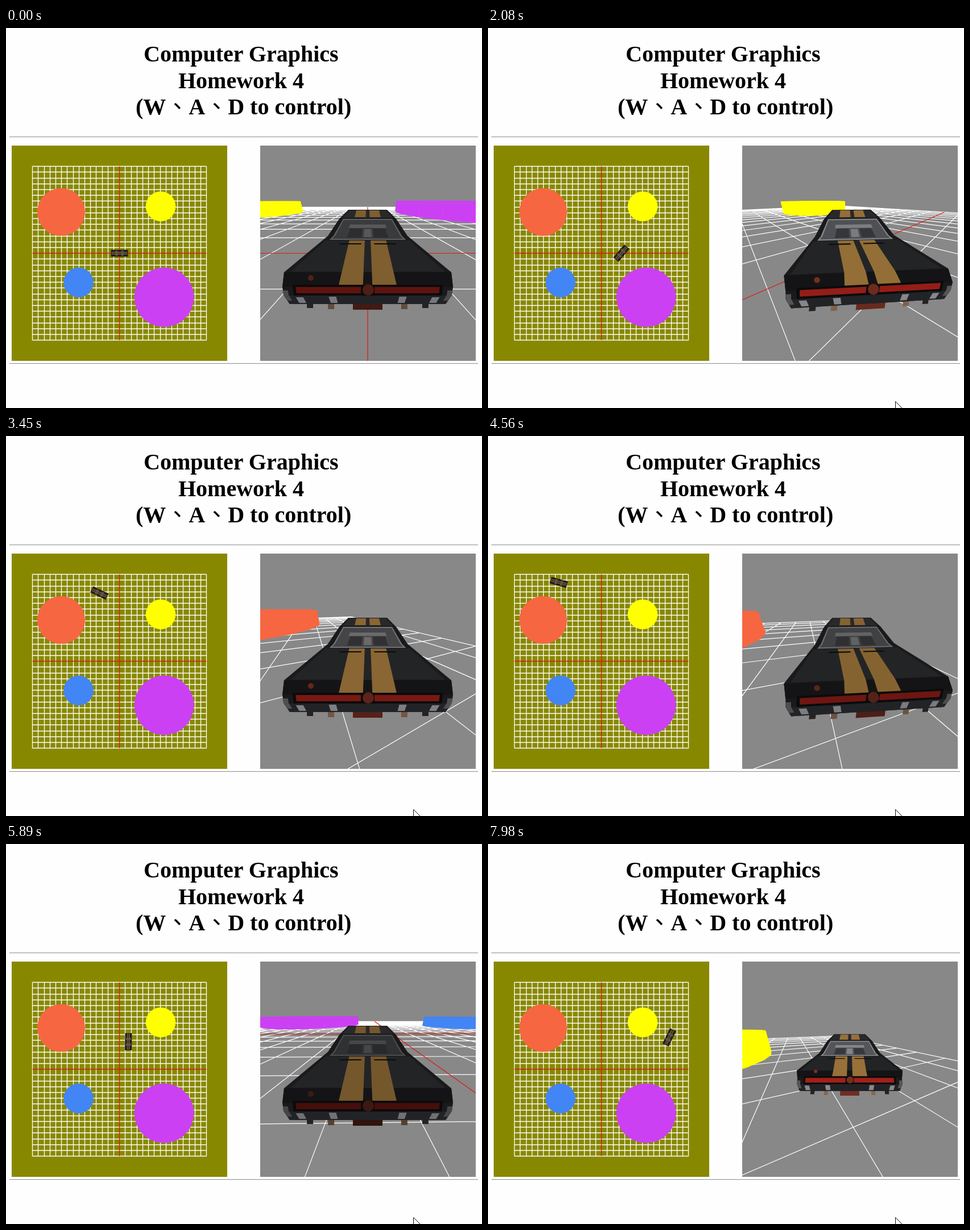
Write an HTML page with a canvas that moves like this. It is 837 px wide and 669 px high and loops after 8000 ms.

```html
<!DOCTYPE html>
<html lang="zh-Hant">
<head>
<meta charset="utf-8">
<title>Computer Graphics Homework 4</title>
<style>
  html, body { margin: 0; width: 100%; height: 100%; overflow: hidden; background: #fefefe; }
  canvas, svg { position: absolute; left: 0; top: 0; }
  text { font: bold 40px "Liberation Serif", "Noto Sans CJK TC", "Noto Sans CJK", serif; }
  tspan { font-weight: 400; }
</style>
</head>
<body>
<canvas id="stage" width="837" height="669"></canvas>
<svg width="837" height="669">
  <text x="242" y="59">Computer Graphics</text>
  <text x="303" y="105.5">Homework 4</text>
  <text x="228" y="152">(W<tspan>、</tspan>A<tspan>、</tspan>D to control)</text>
</svg>
<script>
const ctx = document.getElementById('stage').getContext('2d');
const LOOP = 8000, STEP = 72, CELL = 10.2, HALF = 15 * CELL, FOCAL = 189.5;
const MAP = { x: 199.5, y: 396.5 }, VIEW = { x: 636, y: 396.5 };
const TILT = 0.07, PIVOT = 7.5, CYLINDER_HEIGHT = 0.84 * CELL;
const { sin, cos, hypot, sign, floor, min, max, PI } = Math;

// key, time of the first step, steps, total pixels (W) or radians (A, D)
const drive = [
  ['W', 1680, 3, 35],
  ['A', 2000, 2, 0.8], ['A', 2155, 3, 1.3],
  ['W', 2540, 5, 113], ['W', 3060, 2, 26],
  ['A', 3370, 2, 0.6],
  ['W', 4000, 3, 44],
  ['A', 4560, 1, 0.1], ['A', 4637, 6, 2.7],
  ['W', 5320, 5, 128],
  ['D', 5727, 3, -0.8],
  ['W', 6190, 2, 32],
  ['A', 6420, 4, 1.8],
  ['W', 6970, 3, 62], ['W', 7350, 2, 35],
  ['A', 7590, 3, 0.9],
  ['W', 7980, 1, 21]
];
const WIDE_VIEW = 6900;

const cylinders = [
  [97, 324, 42, '#f66641'], [272, 314, 26.3, '#ffff00'],
  [127.5, 448, 26.3, '#4285f4'], [278, 474, 52.3, '#cc40f4']
];

function poseAt(t) {
  const p = { x: MAP.x, y: MAP.y, dir: 0, tilt: 0, dist: 2 };
  drive.forEach(([key, start, n, amount], i) => {
    if (t < start) return;
    const k = min(n, 1 + floor((t - start) / STEP)), done = amount * k / n;
    const next = drive[i + 1];
    p.tilt = 0;
    if (key === 'W') {
      p.x += done * cos(p.dir);
      p.y -= done * sin(p.dir);
    } else {
      p.dir += done;
      const held = k < n || next[1] - start - n * STEP < 50;
      if (held) p.tilt = sign(amount) * TILT;
    }
    if (t >= WIDE_VIEW) p.dist = key === 'W' ? 2.5 : 2.25;
  });
  return p;
}

const makeCam = d => ({ d: d * CELL, c: d / hypot(d, 1), s: 1 / hypot(d, 1) });
const baseCam = makeCam(2);
let pose, cam, light;

// ahead, right, height relative to the car -> camera space
function toCam(ahead, right, h) {
  const dx = cam.d + ahead, dy = CELL - h;
  return [right, dy * cam.c - dx * cam.s, dx * cam.c + dy * cam.s];
}

function fromWorld(x, y, h = 0) {
  const dx = x - pose.x, dy = y - pose.y, c = cos(pose.dir), s = sin(pose.dir);
  return toCam(dx * c - dy * s, dx * s + dy * c, h);
}

const project = ([x, y, z]) => [VIEW.x + FOCAL * x / z, VIEW.y + FOCAL * y / z];

// path through camera-space points, cut at the near plane
function trace(pts, closed) {
  const near = 0.5, out = [];
  pts.forEach((p, i) => {
    const q = pts[i + 1] || (closed && pts[0]);
    if (p[2] >= near) out.push(p);
    if (q && (p[2] < near) !== (q[2] < near)) {
      const k = (near - p[2]) / (q[2] - p[2]);
      out.push(p.map((v, j) => v + (q[j] - v) * k));
    }
  });
  out.map(project).forEach(([x, y], i) => i ? ctx.lineTo(x, y) : ctx.moveTo(x, y));
  if (closed) ctx.closePath();
}

function disc(color, x, y, r) {
  ctx.fillStyle = color;
  ctx.beginPath();
  ctx.arc(x, y, r, 0, 2 * PI);
  ctx.fill();
}

function box(color, x, y, w, h) {
  ctx.fillStyle = color;
  ctx.fillRect(x, y, w, h);
}

// half-width of the car's outline by height, as seen from straight behind
const outline = [[320, 34], [336, 50], [366, 70], [430, 147], [456, 150], [470, 148], [486, 137]];

function halfWidth(y) {
  const i = outline.findIndex(p => p[0] >= y);
  if (i < 1) return outline[i ? outline.length - 1 : 0][1];
  const [y0, w0] = outline[i - 1], [y1, w1] = outline[i];
  return w0 + (w1 - w0) * (y - y0) / (y1 - y0);
}

// lifts a point of that rear view onto the car, then turns the car about its pivot
function carPoint(x, y) {
  const { d, c, s } = baseCam, v = (y - VIEW.y) / FOCAL;
  const along = max(-15, 2 - (y - 320) * 0.145), dx = d + along;
  const dy = dx * (s + v * c) / (c - v * s);
  const right = x * (dx * c + dy * s) / FOCAL, arm = along - PIVOT;
  const ct = cos(pose.tilt), st = sin(pose.tilt);
  return toCam(PIVOT + arm * ct + right * st, right * ct - arm * st, CELL - dy);
}

// mirrored strip from y0 to y1; its edges are shares of the half-width or functions of y
function band(color, y0, y1, inner, outer) {
  const rows = [y0, ...outline.map(p => p[0]).filter(y => y > y0 && y < y1), y1];
  const at = (edge, y) => typeof edge === 'function' ? edge(y) : edge * halfWidth(y);
  ctx.fillStyle = color;
  for (const side of [-1, 1]) {
    const edge = e => rows.map(y => carPoint(side * at(e, y), y));
    const near = inner === 0 ? y => -0.5 : inner;
    ctx.beginPath();
    trace([...edge(near), ...edge(outer).reverse()], true);
    ctx.fill();
  }
}

function knob(color, x, y, r) {
  const [cx, cy] = project(carPoint(x, y)), [ex, ey] = project(carPoint(x + r, y));
  disc(color, cx, cy, hypot(ex - cx, ey - cy));
}

const lit = (r, g, b, k) => `rgb(${[r, g, b].map(v => Math.round(v * (1 - k + k * light)))})`;

function drawCar() {
  const gold = lit(156, 116, 58, 0.25), chrome = lit(140, 141, 145, 0.2);
  const stripe = (y0, y1) => band(gold, y0, y1, y => 3 + (y - 321) * 0.04, y => 20 + (y - 321) * 0.235);
  // exhausts and plate
  band(lit(140, 108, 84, 0.4), 484, 495, 0.43, 0.51);
  band('#26221f', 484, 493, 0.7, 0.78);
  band(lit(120, 48, 36, 0.6), 484, 496, 0, 0.19);
  // body, roof and rear window
  band('#1a1a1c', 320, 486, 0, 1);
  band('#29292b', 321, 334, 0, 0.92);
  stripe(321, 333);
  band(lit(150, 152, 155, 0.5), 336, 373, 0, 0.86);
  band(lit(88, 89, 92, 0.45), 338, 371, 0, 0.82);
  band(lit(140, 141, 144, 0.5), 346, 352, 0, 0.55);
  band(lit(58, 58, 61, 0.3), 353, 369, 0.15, 0.5);
  band(lit(140, 140, 142, 0.5), 354, 368, 0, 0.1);
  // trunk lid and rear panel
  band('#232426', 374, 429, 0, 0.93);
  band('#141416', 430, 456, 0, 1);
  stripe(374, 453);
  band('#0d0d0e', 379, 381, 0.13, 0.57);
  band('#0b0b0c', 452, 471, 0, 0.88);
  band(lit(172, 34, 27, 0.6), 456, 467, 0.08, 0.845);
  knob(lit(122, 48, 34, 0.5), 1, 461, 10);
  knob(lit(130, 54, 32, 0.5), -100, 440, 5);
  // bumper
  band('#222326', 471, 486, 0, 1);
  band(chrome, 473, 484, 0.38, 0.47);
  band(chrome, 474, 484, 0.78, 0.87);
  band(lit(88, 88, 90, 0.2), 462, 480, 0.94, 1);
}

function drawCylinder([x, y, r, color]) {
  const n = 24, ring = h => Array.from({ length: n }, (_, i) =>
    fromWorld(x + r * cos(2 * PI * i / n), y + r * sin(2 * PI * i / n), h));
  const low = ring(0), top = ring(CYLINDER_HEIGHT);
  const face = pts => { ctx.beginPath(); trace(pts, true); ctx.fill(); ctx.stroke(); };
  ctx.fillStyle = ctx.strokeStyle = color;
  ctx.lineWidth = 0.5;
  low.forEach((p, i) => { const j = (i + 1) % n; face([p, low[j], top[j], top[i]]); });
  face(top);
}

// calls line(x1, y1, x2, y2) for both directions of grid line i
function gridLine(i, line) {
  const o = i * CELL;
  line(MAP.x + o, MAP.y - HALF, MAP.x + o, MAP.y + HALF);
  line(MAP.x - HALF, MAP.y + o, MAP.x + HALF, MAP.y + o);
}

function drawGrid(line, width) {
  ctx.lineWidth = width;
  ctx.strokeStyle = '#fff';
  ctx.beginPath();
  for (let i = -15; i <= 15; i++) if (i) gridLine(i, line);
  ctx.stroke();
  ctx.strokeStyle = '#e01810';
  ctx.beginPath();
  gridLine(0, line);
  ctx.stroke();
}

function drawMap() {
  box('#888800', 10, 207, 379, 379);
  const snap = v => floor(v + 0.2) + 0.5;
  drawGrid((a, b, c, d) => {
    ctx.moveTo(snap(a), snap(b));
    ctx.lineTo(snap(c), snap(d));
  }, 1.3);
  for (const [x, y, r, color] of cylinders) disc(color, x, y, r);
  ctx.save();
  ctx.translate(pose.x, pose.y);
  ctx.rotate(-pose.dir - pose.tilt);
  box('#211d1b', -15, -6, 30, 12);
  for (const x of [-7, 3]) box('#565557', x, -4.5, 4, 9);
  for (const y of [-2.5, 0.5]) box('#6d5436', -14, y, 28, 2);
  ctx.restore();
}

function drawView() {
  ctx.save();
  ctx.beginPath();
  ctx.rect(447, 207, 379, 379);
  ctx.clip();
  box('#888888', 447, 207, 379, 379);
  drawGrid((a, b, c, d) => trace([fromWorld(a, b), fromWorld(c, d)], false), 1.2);
  const depth = c => fromWorld(c[0], c[1])[2];
  [...cylinders].sort((a, b) => depth(b) - depth(a)).forEach(drawCylinder);
  drawCar();
  ctx.restore();
}

function drawCursor(t) {
  if (t < 520) return;
  const y = t < 590 ? 664.5 : t < 1140 ? 661.5 : 657.5;
  ctx.beginPath();
  ctx.moveTo(716.5, y + 17);
  ctx.lineTo(716.5, y);
  ctx.lineTo(728.5, y + 12);
  ctx.lineTo(723.5, y + 12);
  ctx.closePath();
  ctx.fillStyle = '#fff';
  ctx.strokeStyle = '#111';
  ctx.lineWidth = 1;
  ctx.fill();
  ctx.stroke();
}

function draw(t) {
  pose = poseAt(t);
  cam = makeCam(pose.dist);
  light = ((1 + sin(pose.dir + pose.tilt)) / 2) ** 2;
  box('#fefefe', 0, 0, 837, 669);
  for (const y of [191, 590]) {
    box('#9a9a9a', 6, y, 824, 1);
    box('#ececec', 6, y + 1, 824, 1);
  }
  drawMap();
  drawView();
  drawCursor(t);
}

const begin = performance.now();
function tick() {
  draw((performance.now() - begin) % LOOP);
  requestAnimationFrame(tick);
}
tick();
</script>
</body>
</html>
```
